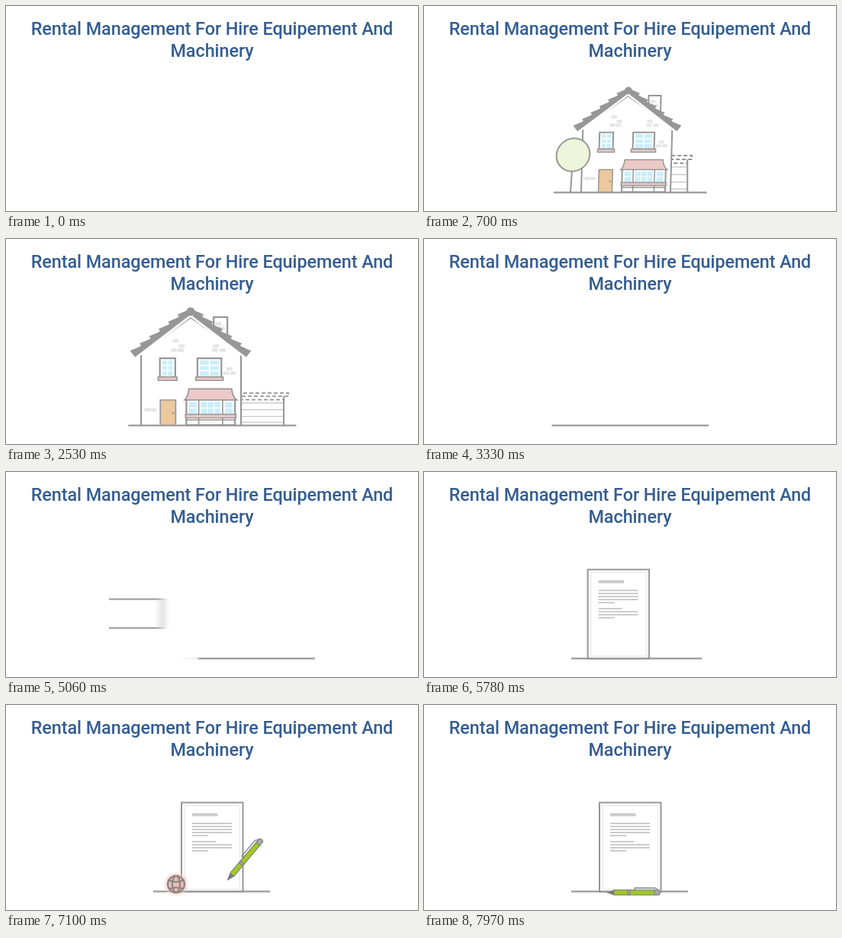
An HTML page for the animation above (8 s loop, 540 px wide and 270 px high).

```html
<!DOCTYPE html>
<html lang="en">
<head>
<meta charset="utf-8">
<title>Rental management</title>
<style>
  html, body { margin: 0; width: 100%; height: 100%; overflow: hidden; background: #fff; }
  svg { display: block; width: 100%; height: 100%; }
  text { font: 500 23.4px Roboto, sans-serif; letter-spacing: -.07px; fill: #345d92; text-anchor: middle; }
  .line { fill: #fff; stroke: #979797; stroke-width: 2; }
  .dash { fill: none; stroke: #979797; stroke-width: 2; stroke-dasharray: 5 3; }
  .pink { fill: #ecc9c8; stroke: #979797; stroke-width: 1.5; }
  .gray { fill: #979797; }
  .pale { fill: #e6e6e6; }
  .glass { fill: #cbeefa; }
</style>
</head>
<body>
<svg viewBox="0 0 540 270">
  <defs>
    <clipPath id="stage"><rect x="135" y="80" width="270" height="180"/></clipPath>
    <clipPath id="loftClip"><rect id="loftMask" y="110" width="60" height="60"/></clipPath>
    <linearGradient id="fadeIn">
      <stop stop-color="#979797" stop-opacity="0"/>
      <stop offset=".85" stop-color="#979797" stop-opacity=".2"/>
      <stop offset="1" stop-color="#979797"/>
    </linearGradient>
    <linearGradient id="fadeOut"><stop stop-color="#979797"/><stop offset="1" stop-color="#979797" stop-opacity="0"/></linearGradient>
    <linearGradient id="edge"><stop stop-color="#ddd" stop-opacity="0"/><stop offset=".55" stop-color="#e4e4e4"/><stop offset="1" stop-color="#eee" stop-opacity="0"/></linearGradient>
    <radialGradient id="glow"><stop offset=".6" stop-color="#edb9ae"/><stop offset="1" stop-color="#f6d5cd" stop-opacity="0"/></radialGradient>
    <g id="slope">
      <path fill="#fff" d="M0 0H82V5H0z"/>
      <path class="gray" id="tiles"/>
    </g>
  </defs>

  <text x="270" y="38">Rental Management For Hire Equipement And</text>
  <text x="270" y="67">Machinery</text>

  <g id="home">
    <g id="garage">
      <path class="dash" d="M303 197H370V202H303M306 207H364V245M364 202V245"/>
      <path stroke="#ccc" stroke-width="1.5" d="M307 212H363M307 222H363M307 232H363M307 241H363"/>
    </g>
    <g id="house">
      <g id="loft" clip-path="url(#loftClip)">
        <path class="dash" d="M232 120H181V125H228M184.5 126V156"/>
      </g>
      <path class="line" d="M269 150V118H285V150z"/>
      <g id="body">
        <path class="line" d="M184 245V160L242 118.500L301 160V245"/>
        <g id="bricks" class="pale"></g>
        <use href="#slope" transform="translate(242 112) rotate(37.500)"/>
        <use href="#slope" transform="translate(242 112) scale(-1 1) rotate(37.500)"/>
        <circle class="gray" cx="242" cy="111.500" r="5"/>
      </g>
      <g id="windows"></g>
      <path fill="#ebc89d" stroke="#979797" stroke-width="1.500" d="M206.500 245V215.500H224.500V245"/>
      <circle cx="221.500" cy="231" r="1.200" fill="#a98"/>
      <path class="line" d="M237 215H294V245H237z"/>
      <path class="glass" d="M240 218h9v14h-9zM254 218h23v14h-23zM282 218h9v14h-9z"/>
      <path fill="none" stroke="#fff" d="M240 225H291M261.500 218V232M269.500 218V232"/>
      <path fill="none" stroke="#979797" stroke-width="1.500" d="M251.500 215V245M279.500 215V245M237 239H294"/>
      <path class="pink" d="M240 202.500H290Q291 212 296 215.500H235Q239 212 240 202.500zM236 232.500H295V236.500H236z"/>
    </g>
    <g id="tree">
      <path class="line" d="M170 216V245"/>
      <circle cx="170" cy="196" r="21.800" fill="#edf5da" stroke="#979797" stroke-width="2"/>
    </g>
  </g>

  <g clip-path="url(#stage)">
    <g id="card">
      <path class="gray" d="M0 166.500H98V168.500H0zM0 204.500H98V206.500H0z"/>
      <path fill="url(#fadeOut)" d="M98 166.500H112V168.500H98zM98 204.500H112V206.500H98z"/>
      <rect x="94" y="168" width="20" height="37" fill="url(#edge)"/>
    </g>
    <g id="doc">
      <path class="line" d="M230 246V128.500H310.500V246z"/>
      <path fill="none" stroke="#e6e6e6" d="M234.500 132.500H306.500V242.500H234.500z"/>
      <path id="copy" stroke="#ccc" stroke-width="2"/>
      <path fill="#ccc" d="M244 142.500h33.500v4h-33.500z"/>
    </g>
  </g>

  <rect id="soft" y="244.500" height="2.200" fill="url(#fadeIn)"/>
  <rect id="ground" class="gray" y="244.500" height="2.200"/>

  <g id="globe">
    <circle r="17" fill="url(#glow)"/>
    <g fill="none" stroke="#858585" stroke-width="2">
      <circle r="11"/>
      <ellipse rx="5" ry="11"/>
      <path d="M-9-5Q0-1 9-5M-9 6Q0 3 9 6"/>
    </g>
  </g>
  <g id="pen" stroke="#858585" stroke-width="1.300" stroke-linejoin="round">
    <path fill="none" d="M36-3V-6H63L67-3"/>
    <path fill="#777" d="M0 0L9-3V3z"/>
    <path fill="#9fcb1f" d="M9-3.200H62V3.200H9z"/>
    <path fill="#aaa" d="M27-3.200h3V3.200h-3zM62-3.200H68Q71 0 68 3.200H62z"/>
  </g>
</svg>
<script>
const LOOP = 8000;
const el = id => document.getElementById(id);
const span = (t, a, b) => Math.min(1, Math.max(0, (t - a) / (b - a)));
const mix = (a, b, k) => a + (b - a) * k;
const easeOut = (u, power = 2) => 1 - (1 - u) ** power;
const quadIO = u => u < .5 ? 2 * u * u : 1 - 2 * (1 - u) ** 2;
const cubicIO = u => u < .5 ? 4 * u ** 3 : 1 - 4 * (1 - u) ** 3;
const backIn = (u, s = 1.9) => u * u * ((s + 1) * u - s);
const backOut = (u, s) => 1 - backIn(1 - u, s);

const place = (id, value) => el(id).setAttribute('transform', value);
const show = (id, on) => el(id).setAttribute('display', on ? 'inline' : 'none');
function bar(id, x, w) {
  el(id).setAttribute('x', x);
  el(id).setAttribute('width', Math.max(0, w));
}

// Static details
let tiles = 'M0-4H84V2.500H0z';
for (let i = 0; i < 6; i++) tiles += `M${i * 14} 0V-3.500L${i * 14 + 14}-7V0z`;
el('tiles').setAttribute('d', tiles);

const bricks = [[221, 144], [228, 150], [219, 155], [227, 155], [268, 150], [276, 155],
  [267, 155], [188, 225], [195, 225], [284, 177], [288, 182], [280, 182], [271, 124], [275, 129]];
el('bricks').innerHTML = bricks.map(([x, y]) => `<rect x="${x}" y="${y}" width="7" height="4"/>`).join('');

const pane = (x, w) => `
  <rect class="line" x="${x}" y="166.500" width="${w}" height="22"/>
  <rect class="glass" x="${x + 3}" y="169" width="${w - 6}" height="18"/>
  <path stroke="#fff" stroke-width="1.500" d="M${x + w / 2} 168v20M${x + 2} 175h${w - 4}M${x + 2} 181h${w - 4}"/>
  <rect class="pink" x="${x - 2}" y="188.500" width="${w + 4}" height="4"/>`;
el('windows').innerHTML = pane(206, 18) + pane(250, 28);

const copy = [[156, 52], [160, 52], [164, 52], [168, 52], [172, 21], [180, 31], [184, 52], [188, 52], [192, 21]];
el('copy').setAttribute('d', copy.map(([y, w]) => `M244 ${y}h${w}`).join(''));

function drawHome(t) {
  show('home', t >= 100 && t < 2830);
  const dx = 25 * (1 - cubicIO(span(t, 520, 1100)));
  const u = 3 * span(t, 520, 2260);
  const lean = -2.7 * Math.sin(Math.PI * u) * Math.exp(-u);
  const size = t < 2380 ? backOut(span(t, 110, 620)) : 1 - backIn(span(t, 2380, 2830), 2.1);
  place('house', `translate(${242 + dx} 245) skewX(${lean}) scale(${size}) translate(-242 -245)`);

  const grow = t < 2200 ? backOut(span(t, 300, 680)) : 1 - backIn(span(t, 2200, 2500));
  place('tree', `translate(${170 + dx} 245) skewX(${lean * 2.5}) scale(${grow}) translate(-170 -245)`);

  show('garage', t >= 440);
  const slide = -68 * (1 - easeOut(span(t, 440, 990)));
  const tall = 1 - quadIO(span(t, 2450, 2780));
  place('garage', `translate(${slide} 245) scale(1 ${tall}) translate(0 -245)`);

  const open = quadIO(span(t, 1200, 1650)) - quadIO(span(t, 2250, 2480));
  el('loftMask').setAttribute('x', 234 - 56 * open);
}

function drawGround(t) {
  let left = 270.3, right = 270.3, blur = 0;
  if (t < 4600) {
    const half = 110 * quadIO(span(t, 100, 860)) * (1 - easeOut(span(t, 3305, 4080)));
    left -= half;
    right += half;
  } else {
    const u = span(t, 4640, 5390);
    left = mix(405, 193, easeOut(u, 2.2));
    right = mix(405, 346, easeOut(span(t, 5450, 6200)));
    blur = Math.min(60 * (1 - u), right - left);
  }
  bar('soft', left, blur);
  bar('ground', left + blur, right - left - blur);
}

function drawContract(t) {
  show('card', t > 4640 && t < 5390);
  place('card', `translate(${mix(405, -54, cubicIO(span(t, 4640, 5390)))} 0)`);

  show('doc', t >= 5450);
  place('doc', `translate(${176 * (1 - backOut(span(t, 5450, 6200)))} 0)`);

  const pop = backOut(span(t, 6230, 6390)) * (1 - quadIO(span(t, 7860, 7965)));
  show('globe', pop > 0);
  place('globe', `translate(223 236) scale(${pop})`);
}

// Each pose: time, tip x, tip y, angle
const poses = [[6240, 319, 246, 0], [6400, 311, 241, -6], [6420, 311, 241, -6],
  [6950, 290, 230, -50], [7720, 290, 230, -50], [7970, 240, 247, 0]];

function drawPen(t) {
  show('pen', t >= 6250);
  let i = 0;
  while (i < poses.length - 2 && t > poses[i + 1][0]) i++;
  const a = poses[i], b = poses[i + 1];
  const k = quadIO(span(t, a[0], b[0]));
  const [x, y, angle] = [1, 2, 3].map(n => mix(a[n], b[n], k));
  const write = span(t, 7070, 7700);
  const wave = Math.sin(write * Math.PI);
  const px = x + 4 * wave * Math.sin(write * 19);
  const py = y + 2.5 * wave * Math.sin(write * 32);
  place('pen', `translate(${px} ${py}) rotate(${angle})`);
  el('pen').setAttribute('opacity', span(t, 6240, 6380));
}

function draw(t) {
  drawHome(t);
  drawGround(t);
  drawContract(t);
  drawPen(t);
}

const start = performance.now();
function tick() {
  draw((performance.now() - start) % LOOP);
  requestAnimationFrame(tick);
}
tick();
</script>
</body>
</html>
```
